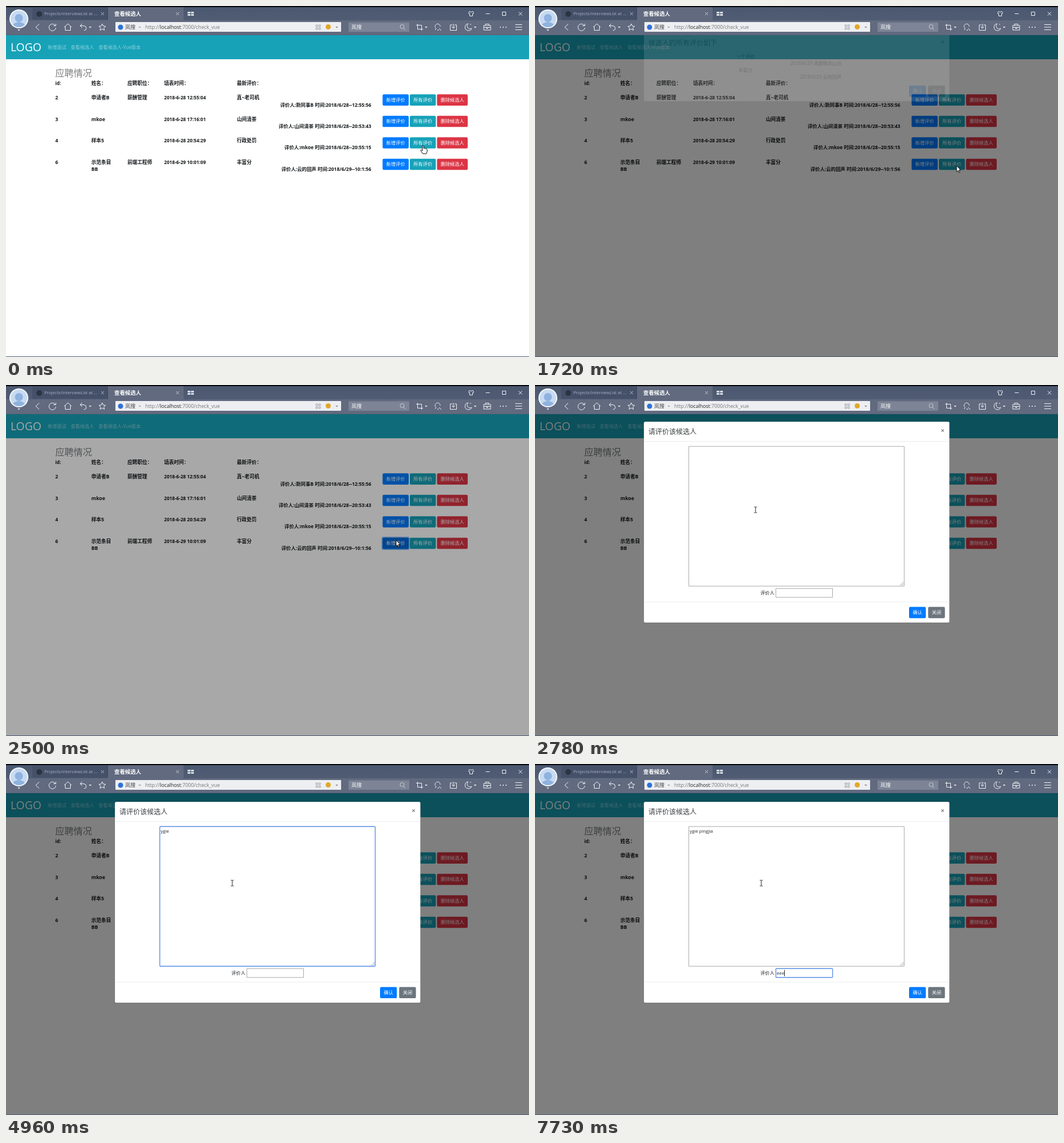
Animation of 913x613 px, one loop 8000 ms. Source, as an HTML page with a canvas:

```html
<!DOCTYPE html>
<html lang="zh-CN">
<head>
<meta charset="utf-8">
<title>查看候选人</title>
<style>
html, body { margin: 0; width: 100%; height: 100%; overflow: hidden; background: #fff; }
canvas { display: block; }
</style>
</head>
<body>
<canvas id="stage" width="913" height="613"></canvas>
<script>
const ctx = document.getElementById('stage').getContext('2d');
const LOOP = 8000;
const FONT = '"Open Sans","Noto Sans CJK SC","Noto Sans CJK",sans-serif';
const TICKS = [0, 120, 250, 390, 520, 650, 790, 930, 1050, 1200, 1330, 1600, 1720, 1850, 1980,
  2110, 2240, 2370, 2500, 2650, 2780, 2920, 3050, 3180, 3450, 4010, 4150, 4290, 4430, 4960,
  5250, 5390, 5520, 5660, 5940, 6370, 6900, 7180, 7320, 7460];

const clamp = v => Math.max(0, Math.min(1, v));
const easeOut = p => 1 - Math.pow(1 - clamp(p), 1.7);
const latest = (list, t) => list.reduce((value, [at, next]) => t >= at ? next : value, '');

function text(str, x, y, size, color, { weight = 400, align = 'left' } = {}) {
  ctx.font = `${weight} ${size}px ${FONT}`;
  ctx.fillStyle = color;
  ctx.textAlign = align;
  ctx.fillText(str, x, y + size * 0.36);
  return ctx.measureText(str).width;
}
function rect(x, y, w, h, color) {
  ctx.fillStyle = color;
  ctx.fillRect(x, y, w, h);
}
function box(x, y, w, h, r, fill, stroke, width = 1) {
  ctx.beginPath();
  ctx.roundRect(x, y, w, h, r);
  if (fill) { ctx.fillStyle = fill; ctx.fill(); }
  if (stroke) { ctx.strokeStyle = stroke; ctx.lineWidth = width; ctx.stroke(); }
}
function disc(x, y, r, fill) {
  ctx.beginPath();
  ctx.arc(x, y, r, 0, 7);
  ctx.fillStyle = fill;
  ctx.fill();
}
function stroke(d, x, y, color = '#f0f2f5', width = 1) {
  ctx.save();
  ctx.translate(x, y);
  ctx.strokeStyle = color;
  ctx.lineWidth = width;
  ctx.stroke(new Path2D(d));
  ctx.restore();
}
function shape(d, x, y, fill, line) {
  ctx.save();
  ctx.translate(x, y);
  const path = new Path2D(d);
  ctx.fillStyle = fill;
  ctx.fill(path);
  if (line) { ctx.strokeStyle = line; ctx.lineWidth = 1; ctx.stroke(path); }
  ctx.restore();
}
const caretDown = (x, y, color = '#eef0f3') => shape('M-2.3-1H2.3L0 1.5Z', x, y, color);
const cross = (x, y, r, color, width) => stroke(`M${-r} ${-r}L${r} ${r}M${r} ${-r}L${-r} ${r}`, x, y, color, width);

function drawChrome() {
  const bar = ctx.createLinearGradient(0, 2, 0, 25);
  bar.addColorStop(0, '#4a5870');
  bar.addColorStop(1, '#505c73');
  rect(0, 0, 913, 51, '#616a7f');
  rect(0, 2, 913, 23, bar);
  rect(0, 0, 913, 2, '#05070b');
  rect(46, 3, 131, 21, '#455168');
  rect(178, 2, 132, 23, '#616a7f');
  rect(177, 3, 1, 21, '#3c475c');
  rect(0, 50, 913, 1, '#596378');
  rect(0, 612, 913, 1, '#4c5c78');

  disc(22.5, 22.5, 16.5, '#f4f7fb');
  disc(22.5, 22.5, 14.5, '#c6dbf2');
  ctx.save();
  ctx.beginPath();
  ctx.arc(22.5, 22.5, 14.5, 0, 7);
  ctx.clip();
  ctx.beginPath();
  ctx.ellipse(22.5, 37, 12, 9, 0, 0, 7);
  ctx.fillStyle = '#8fb2df';
  ctx.fill();
  disc(22.5, 21, 7, '#8fb2df');
  ctx.restore();
  caretDown(22.5, 42);

  disc(58, 14, 5, '#2b3444');
  text('Projects/interviewList at ...', 67, 13.5, 7.6, '#a8b3c5');
  cross(168.5, 13.5, 2.5, '#b6bfcd');
  text('查看候选人', 189, 13.5, 9.4, '#fff', { weight: 700 });
  cross(299.5, 13.5, 2.5, '#c5cbd6');
  for (const dx of [0, 6]) for (const dy of [0, 4]) rect(317 + dx, 10 + dy, 5, 3, '#d5dae3');
  stroke('M-4-3L-2-4Q0-1 2-4L4-3V0H2.5V4H-2.5V0H-4Z', 812, 13.5);
  stroke('M-3.5 0H3.5', 841, 13.5);
  box(866.5, 10.5, 6, 6, 0, null, '#f0f2f5');
  cross(898, 13.5, 3, '#f0f2f5');

  stroke('M3-5.5L-3 0L3 5.5', 55, 37);
  stroke('M5-3A6 6 0 1 0 6 1M6-6V-2.5H2', 81, 37);
  stroke('M-6.5 0L0-6L6.5 0M-4.5-1.5V5.5H4.5V-1.5', 108, 37);
  stroke('M-2-6L-5.5-2.5L-2 1M-5.5-2.5H1Q5-2 5 2T1 5.5', 135, 37);
  caretDown(147, 37);
  stroke('M0-6L1.8-2L6-1.6L2.8 1.2L3.8 5.5L0 3.2L-3.8 5.5L-2.8 1.2L-6-1.6L-1.8-2Z', 168, 37);

  box(191, 28, 394, 17, 1, '#eeeff2');
  disc(200, 37, 4.5, '#2d72d9');
  text('岚搜', 208, 36.5, 9, '#444');
  caretDown(233.5, 37, '#9a9fa8');
  let x = 243;
  for (const [part, color] of [['http://', '#777'], ['localhost', '#222'], [':7000/check_vue', '#777']])
    x += text(part, x, 37, 8.8, color);
  for (const dx of [-4, 1]) for (const dy of [-4, 1]) box(545 + dx, 37 + dy, 3, 3, 0, null, '#a0a4ac');
  disc(562.5, 36.5, 4.5, '#e0a82a');
  caretDown(577.5, 37, '#85898f');

  box(598, 28.5, 106, 16.5, 1, '#7c8496');
  text('岚搜', 603, 36.5, 9, '#fff');
  stroke('M3-1A3.5 3.5 0 1 1-4-1A3.5 3.5 0 1 1 3-1M2 2L5 5', 692, 37, '#c9ced8');

  stroke('M-3.5-6V3.5H6M-6-3.5H3.5V6', 722, 37);
  caretDown(733.5, 37);
  stroke('M4-1A4.5 4.5 0 1 0-3 2.5L-5 5M2 2L6 6M-1 5H2', 754, 37);
  stroke('M-2-4H-5.5V5.5H5.5V-4H2M0-6V2M-3-1L0 2L3-1', 781, 37);
  stroke('M0-6A6 6 0 1 0 6 2A5 5 0 0 1 0-6M3-5H5', 807, 37);
  caretDown(819, 37);
  stroke('M-6-3H6V5H-6ZM-3-3V-5.5H3V-3M-6 .5H6M-1 .5V2.5H1V.5', 840, 37);
  for (const dx of [-5, 0, 5]) disc(868 + dx, 37, 1, '#f0f2f5');
  stroke('M-6-4.5H6M-6 0H6M-6 4.5H6', 895, 37);
}

const BUTTONS = [
  { x: 657.4, w: 45.6, label: '新增评价', color: '#007bff', dark: '#0069d9', ring: 'rgba(0,123,255,.5)' },
  { x: 705, w: 45.4, label: '所有评价', color: '#17a2b8', dark: '#138496', ring: 'rgba(23,162,184,.5)' },
  { x: 752.4, w: 53.6, label: '删除候选人', color: '#dc3545' }
];
const ROWS = [
  ['2', ['申请者B'], '薪酬管理', '2018-6-28 12:55:04', '真~老司机', '新同事B', '2018/6/28--12:55:56'],
  ['3', ['mkoe'], '', '2018-6-28 17:16:01', '山间清茶', '山间清茶', '2018/6/28--20:53:43'],
  ['4', ['样本5'], '', '2018-6-28 20:54:29', '行政处罚', 'mkoe', '2018/6/28--20:55:15'],
  ['6', ['示范条目', 'BB'], '前端工程师', '2018-6-29 10:01:09', '丰富分', '云的回声', '2018/6/29--10:1:56']
];
const COLUMNS = [86, 149, 212, 276, 403];

function button(x, y, w, h, label, color) {
  box(x, y, w, h, 2.2, color);
  text(label, x + w / 2, y + h / 2 - 0.2, 8.2, '#fff', { align: 'center' });
}

function drawPage(focused) {
  rect(0, 51, 913, 561, '#fff');
  rect(0, 51, 913, 42, '#17a2b8');
  text('LOGO', 8, 71.6, 19.3, '#fff');
  const link = 'rgba(255,255,255,.5)';
  text('新增面试', 73, 72, 8.1, link);
  text('查看候选人', 113, 72, 8.1, link);
  text('查看候选人-Vue版本', 161.5, 72, 8.1, link);
  text('应聘情况', 86, 117.5, 16, '#7c7f82', { weight: 300 });

  const bold = { weight: 700 }, ink = '#15181b';
  ['id:', '姓名：', '应聘职位：', '填表时间：', '最新评价：']
    .forEach((label, i) => text(label, COLUMNS[i], 135, i ? 8.6 : 8.2, ink, bold));

  ROWS.forEach(([id, name, job, filled, review, author, when], row) => {
    const top = 154.3 + row * 37.45, y = top + 6;
    [id, name[0], job, filled, review].forEach((s, i) => text(s, COLUMNS[i], y, i === 3 ? 8.2 : 8.6, ink, bold));
    if (name[1]) text(name[1], 149, y + 12.2, 8.6, ink, bold);
    text(`评价人:${author} 时间:${when}`, 637.5, y + 12.2, 8.4, ink, { weight: 700, align: 'right' });
    BUTTONS.forEach((b, col) => {
      const active = row === 3 && col === focused;
      if (active) box(b.x - 1.7, top - 1.7, b.w + 3.4, 23, 3.5, b.ring);
      button(b.x, top, b.w, 19.6, b.label, active ? b.dark : b.color);
    });
  });
}

function modalFrame(top, height, title) {
  box(190, top, 533.5, height, 2.5, '#fff', 'rgba(0,0,0,.2)', 0.8);
  text(title, 198, top + 17.5, 12, '#3c4043', { weight: 300 });
  cross(711.5, top + 15.5, 2.1, '#777', 1.2);
  rect(190.5, top + 34, 532.5, 0.8, '#e4e7ea');
  rect(190.5, top + height - 36.5, 532.5, 0.8, '#e4e7ea');
  button(653, top + height - 27.5, 29.3, 19.6, '确认', '#007bff');
  button(686.3, top + height - 27.5, 29.3, 19.6, '关闭', '#6c757d');
}

function drawReviews(top) {
  modalFrame(top, 119.5, '候选人的所有评价如下:');
  const right = { align: 'right' }, ink = '#212529';
  text('一个评价', 351.5, top + 41, 8.1, ink);
  text('2018/6/29 清晨微风山谷', 535, top + 53, 8.1, ink, right);
  text('丰富分', 355, top + 65, 8.1, ink);
  text('2018/6/29 云的回声', 535, top + 77, 8.1, ink, right);
}

function field(x, y, w, h, value, textY, focused, caret) {
  box(x + 0.5, y + 0.5, w - 1, h - 1, focused ? 1 : 0, '#fff', focused ? '#5a8fe6' : '#a9a9a9', focused ? 1.4 : 1);
  const width = text(value, x + 2, textY, 7.8, '#212529');
  if (caret) rect(Math.round(x + 1.5 + width), textY - 5.5, 1, 11, '#222');
}

function drawForm(top, t) {
  const note = latest([[4010, 'y'], [4150, 'yg'], [4290, 'ygi'], [4430, 'ygie'], [5250, 'ygie '],
    [5390, 'ygie pi'], [5520, 'ygie ping'], [5660, 'ygie pingjia']], t);
  const author = latest([[7180, 'e'], [7320, 'ee'], [7460, 'eee']], t);
  const inNote = t >= 3450 && t < 5940, inAuthor = t >= 5940;
  const blink = !(t >= 4960 && t < 5250) && !(t >= 6370 && t < 6900);
  modalFrame(top, 351, '请评价该候选人');
  field(268, top + 42.7, 377, 245, note, top + 50.7, inNote, inNote && blink);
  stroke('M-6 0L0-6M-3 0L0-3', 643.5, top + 286, '#888', 0.8);
  text('评价人', 393.5, top + 299, 8.1, '#212529');
  field(420, top + 290.8, 100, 16.5, author, top + 299.2, inAuthor, inAuthor && blink);
}

// The dialog fades as one layer, so its parts do not show through each other.
const layer = document.createElement('canvas').getContext('2d');
layer.canvas.width = 913;
layer.canvas.height = 613;

function withModal(height, opacity, hidden, draw) {
  if (opacity <= 0) return;
  const top = 66 - hidden * height / 4;
  if (opacity >= 1) return draw(top);
  layer.clearRect(0, 0, 913, 613);
  layer.drawImage(ctx.canvas, 0, 0);
  draw(top);
  ctx.globalAlpha = 1 - opacity;
  ctx.drawImage(layer.canvas, 0, 0);
  ctx.globalAlpha = 1;
}

const PATH = [[0, 728, 243], [120, 728, 244], [650, 736, 279], [1850, 736, 279], [2240, 681, 271],
  [2500, 681, 271], [2780, 385, 218], [3050, 395, 208]];
function pointerAt(t) {
  let i = PATH.length - 1;
  while (PATH[i][0] > t) i--;
  const [t0, x0, y0] = PATH[i], [t1, x1, y1] = PATH[i + 1] || [LOOP, x0, y0];
  const p = (t - t0) / (t1 - t0);
  const kind = t >= 2780 ? 'beam' : t < 930 || (t >= 2040 && t < 2500) ? 'hand' : 'arrow';
  return { x: x0 + (x1 - x0) * p, y: y0 + (y1 - y0) * p, kind };
}
function drawPointer({ x, y, kind }) {
  if (kind === 'beam') stroke('M-2.5-5H-.5L0-4.5L.5-5H2.5M0-4.5V4.5M-2.5 5H-.5L0 4.5L.5 5H2.5', x, y, '#222');
  else if (kind === 'arrow') shape('M0 0V10.5L2.4 8.3L4 12L5.6 11.3L4 7.7H7.2Z', x, y, '#fff', '#111');
  else shape('M-1 1Q0-.8 1.2 1V5.5Q2.6 4.6 3.5 6Q4.8 5.2 5.6 6.6Q7 6 7.2 7.8V11L5.8 15H-.4L-4.2 9.5Q-4.2 7.6-2.6 8.4L-1 10Z',
    x, y, '#fff', '#111');
}

function render(t) {
  const focused = (t >= 790 && t < 1080) || (t >= 1890 && t < 2370) ? 1 : t >= 2370 && t < 2540 ? 0 : -1;
  drawPage(focused);

  const shade = t < 2200
    ? Math.min(clamp((t - 795) / 150), clamp((2040 - t) / 150))
    : clamp((t - 2398) / 150);
  rect(0, 51, 913, 561, `rgba(0,0,0,${shade / 2})`);

  if (t >= 1080 && t < 1900) {
    const closing = t >= 1585;
    withModal(119.5, closing ? 1 - (t - 1585) / 155 : (t - 1080) / 150,
      closing ? easeOut((t - 1585) / 300) : 1 - easeOut((t - 1080) / 250), drawReviews);
  }
  if (t >= 2530)
    withModal(351, (t - 2530) / 150, 1 - easeOut((t - 2530) / 280), top => drawForm(top, t));
  drawPointer(pointerAt(t));
  drawChrome();
}

function loop() {
  const now = performance.now() % LOOP;
  render(TICKS.filter(at => at <= now).pop());
  requestAnimationFrame(loop);
}
loop();
</script>
</body>
</html>
```
